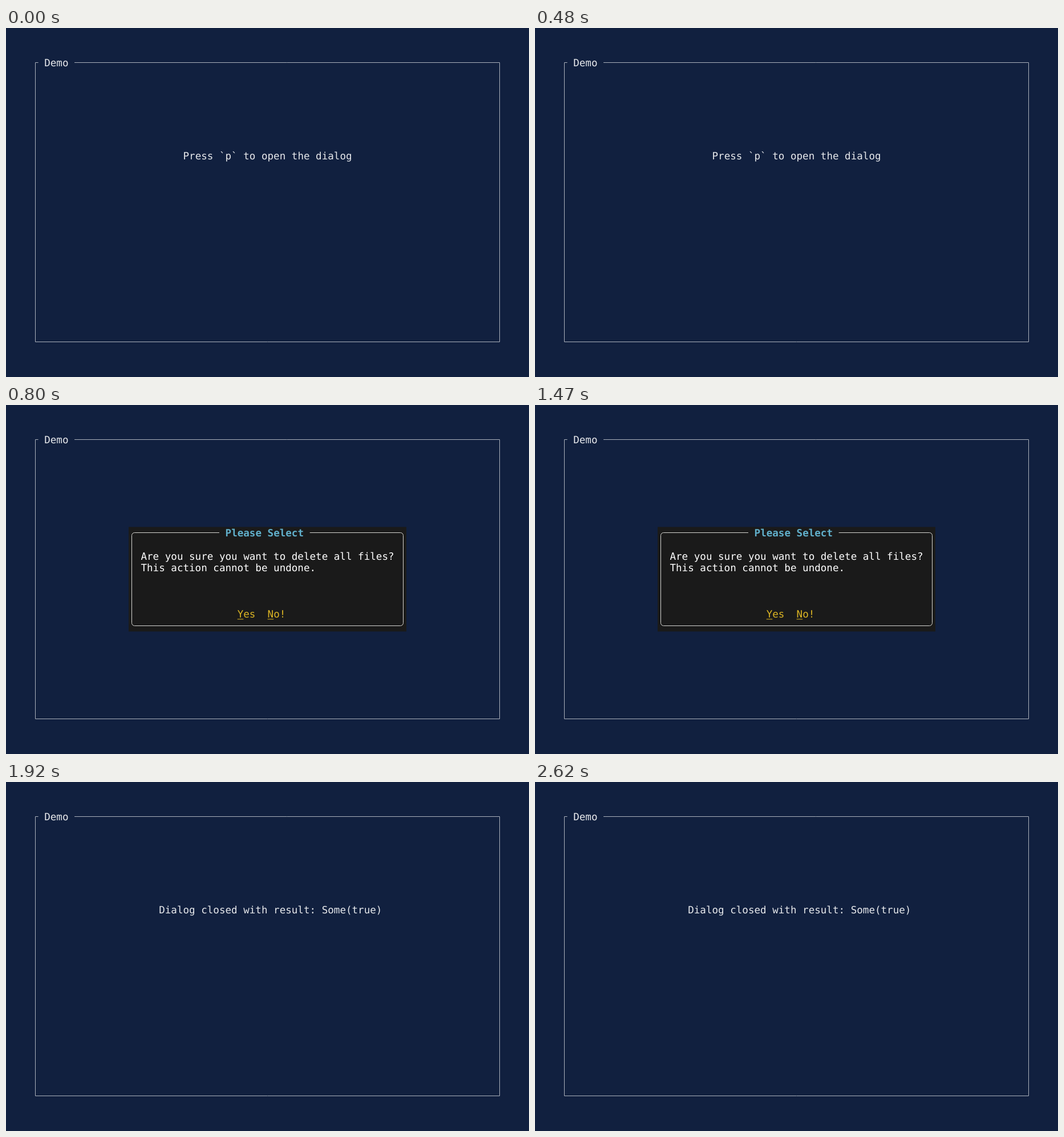
These frames come from a looping animation (917x611 px, 3.08 s). An HTML page with a canvas:

```html
<!DOCTYPE html>
<html lang="en">
<head>
<meta charset="utf-8">
<title>Terminal dialog</title>
<style>
  html, body { margin: 0; width: 100%; height: 100%; overflow: hidden; background: #11203f; }
  canvas { display: block; width: 917px; height: 611px; }
</style>
</head>
<body>
<canvas id="stage" width="917" height="611"></canvas>
<script>
const ctx = document.getElementById('stage').getContext('2d');

// Terminal grid
const LEFT = 46, CELL_W = 10.58;
const FIRST_ROW = 60.7, CELL_H = 20.37;
const FONT = '17.57px "DejaVu Sans Mono", monospace';

const LOOP = 3080, OPEN_AT = 800, CLOSE_AT = 1920;
const BG = '#11203f', FG = '#e7e9ec', FRAME = '#abb1bc';
const PANEL = '#1a1a1a', PANEL_FG = '#ffffff', PANEL_FRAME = '#d6d6d2';
const TITLE = '#61b0cb', KEY = '#dcb524';

const colX = col => LEFT + col * CELL_W;
const rowY = row => FIRST_ROW + row * CELL_H;

function write(str, col, row, color, bold) {
  ctx.font = (bold ? 'bold ' : '') + FONT;
  ctx.fillStyle = color;
  ctx.fillText(str, colX(col), rowY(row) + 6.2);
}

// Box outline with a gap in the top edge for its title
function frame(x1, y1, x2, y2, gapFrom, gapTo, radius, color) {
  ctx.strokeStyle = color;
  ctx.lineWidth = 1;
  ctx.beginPath();
  ctx.moveTo(colX(gapTo), y1);
  ctx.arcTo(x2, y1, x2, y2, radius);
  ctx.arcTo(x2, y2, x1, y2, radius);
  ctx.arcTo(x1, y2, x1, y1, radius);
  ctx.arcTo(x1, y1, x2, y1, radius);
  ctx.lineTo(colX(gapFrom), y1);
  ctx.stroke();
}

function button(label, col, row) {
  write(label, col, row, KEY);
  ctx.fillRect(colX(col), rowY(row) + 8.2, CELL_W, 1);
}

function dialog() {
  ctx.fillStyle = PANEL;
  ctx.fillRect(215, 213.5, 487, 183);
  frame(220.5, 223.5, 696.5, 386.5, 31, 46, 5, PANEL_FRAME);
  write('Please Select', 32, 8, TITLE, true);
  write('Are you sure you want to delete all files?', 18, 10, PANEL_FG);
  write('This action cannot be undone.', 18, 11, PANEL_FG);
  button('Yes', 34, 15);
  button('No!', 39, 15);
}

function draw(t) {
  ctx.fillStyle = BG;
  ctx.fillRect(0, 0, 917, 611);
  frame(51.5, 60.5, 865.5, 549.5, 1, 7, 0, FRAME);
  write('Demo', 2, 0, FG);
  if (t < OPEN_AT) write('Press `p` to open the dialog', 25, 8, FG);
  else if (t < CLOSE_AT) dialog();
  else write('Dialog closed with result: Some(true)', 21, 8, FG);
}

const start = performance.now();
function tick() {
  draw((performance.now() - start) % LOOP);
  requestAnimationFrame(tick);
}
ctx.textRendering = 'geometricPrecision';
tick();
</script>
</body>
</html>
```
